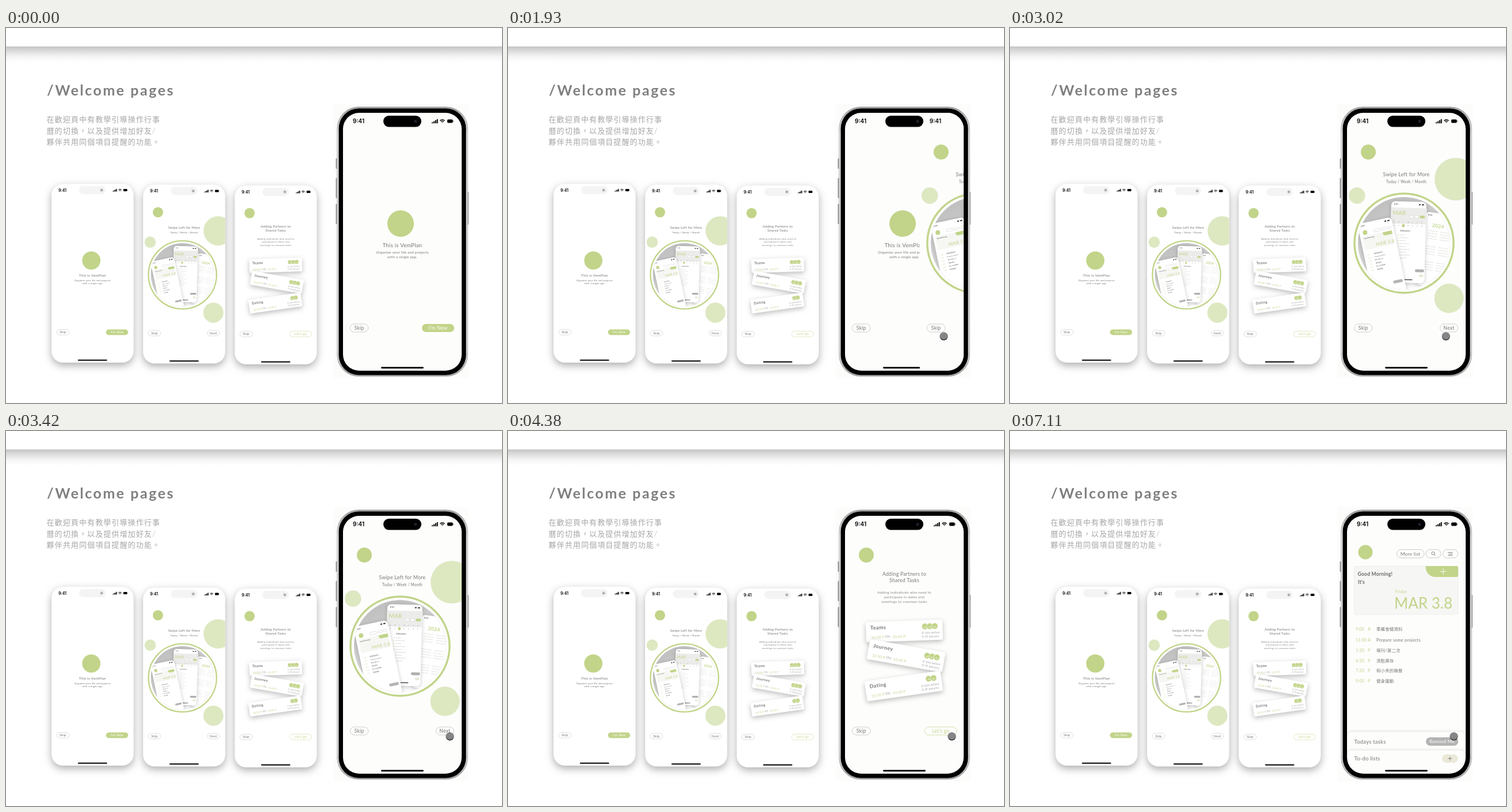
Animation, 861 px wide and 650 px high, one loop 8 s. Source, as an HTML page with a canvas:

```html
<!DOCTYPE html>
<html lang="zh-Hant">
<head>
<meta charset="utf-8">
<title>Welcome pages</title>
<style>
html, body { margin: 0; width: 100%; height: 100%; overflow: hidden; background: #fff; }
canvas { display: block; width: 861px; height: 650px; }
</style>
</head>
<body>
<canvas id="stage"></canvas>
<script>
const W = 861, H = 650, LOOP = 8000;
const GREEN = '#c1d489', PALE = '#dde8c1', GREY = '#777', SOFT = '#999', PAPER = '#fdfdfc';
const FONT = 'Lato, "Noto Sans CJK TC", "Noto Sans CJK", sans-serif';
const CLOCK_FONT = 'Inter, sans-serif';
const SCREEN = { x: 585, y: 147, w: 206, h: 447 };
const MINI = 0.687;
const dpr = window.devicePixelRatio || 1;
let c;

function setup(cv) {
  cv.width = W * dpr;
  cv.height = H * dpr;
  const g = cv.getContext('2d');
  g.scale(dpr, dpr);
  return g;
}

function layer(draw) {
  const cv = document.createElement('canvas');
  c = setup(cv);
  draw();
  return cv;
}

// y is the middle of the capital letters
function text(s, x, y, size, color = GREY, { align = 'left', weight = 400, gap = 0.03, font = FONT } = {}) {
  c.font = `${weight} ${size}px ${font}`;
  c.letterSpacing = size * gap + 'px';
  c.textAlign = align;
  c.fillStyle = color;
  c.fillText(s, x, y + size * 0.36);
}
const centred = (s, x, y, size, color, weight) => text(s, x, y, size, color, { align: 'center', weight });

function box(x, y, w, h, r, fill, stroke, lw = 0.7) {
  c.beginPath();
  c.roundRect(x, y, w, h, r);
  if (fill) { c.fillStyle = fill; c.fill(); }
  if (stroke) { c.strokeStyle = stroke; c.lineWidth = lw; c.stroke(); }
}

function disc(x, y, r, fill) {
  c.beginPath();
  c.arc(x, y, r, 0, 7);
  c.fillStyle = fill;
  c.fill();
}

function line(color, lw, ...p) {
  c.beginPath();
  for (let i = 0; i < p.length; i += 4) {
    c.moveTo(p[i], p[i + 1]);
    c.lineTo(p[i + 2], p[i + 3]);
  }
  c.strokeStyle = color;
  c.lineWidth = lw;
  c.stroke();
}
const plus = (x, y, r, color) => line(color, 0.9, x - r, y, x + r, y, x, y - r, x, y + r);

function shadow(color, blur, dx, dy) {
  c.shadowColor = color;
  c.shadowBlur = blur * dpr;
  c.shadowOffsetX = dx * dpr;
  c.shadowOffsetY = dy * dpr;
}
const noShadow = () => shadow('transparent', 0, 0, 0);

function at(x, y, deg, draw) {
  c.save();
  c.translate(x, y);
  c.rotate(deg * Math.PI / 180);
  draw();
  c.restore();
}

function statusBar() {
  text('9:41', 602, 161.5, 10, '#000', { weight: 600, gap: 0, font: CLOCK_FONT });
  for (let i = 0; i < 4; i++) box(739 + i * 2.9, 163.2 - i * 1.7, 2, 2 + i * 1.7, 0.5, '#000');
  c.strokeStyle = '#000';
  c.lineWidth = 1.3;
  for (const r of [1, 3.3, 5.6]) {
    c.beginPath();
    c.arc(757.5, 164.6, r, -Math.PI * 0.76, -Math.PI * 0.24);
    c.stroke();
  }
  box(766, 158.6, 9.6, 5.8, 1.6, '#000');
  box(776, 160.5, 0.8, 2, 0.4, '#000');
}
const homeBar = () => box(651, 587.4, 74, 2.8, 1.4, '#000');

function button(label, x, w, line, color, fill) {
  box(x, 513, w, 14, 7, fill, line);
  centred(label, x + w / 2, 520, 8.6, color);
}

function page(draw) {
  c.save();
  c.beginPath();
  c.rect(SCREEN.x, SCREEN.y, SCREEN.w, SCREEN.h);
  c.clip();
  c.fillStyle = PAPER;
  c.fillRect(SCREEN.x, SCREEN.y, SCREEN.w, SCREEN.h);
  statusBar();
  draw();
  homeBar();
  c.restore();
}

const skip = () => button('Skip', 597.5, 31.5, '#bbb', GREY);

function intro() {
  disc(685, 339, 23, GREEN);
  centred('This is VemPlan', 688, 377, 9.4, GREY);
  centred('Organize your life and projects', 688, 388.6, 6.4, GREY);
  centred('with a single app.', 688, 397, 6.4, GREY);
  skip();
  button("I'm New", 722, 56, null, '#fff', GREEN);
}

function miniStatus(w) {
  text('9:41', 5, 5, 3.2, '#333', { weight: 600, font: CLOCK_FONT });
  box(w - 13, 4, 3, 2, 0.3, '#333');
  box(w - 8, 4, 4, 2, 0.6, '#333');
}

function miniCard(x, y, deg, w, h, draw) {
  at(x, y, deg, () => {
    shadow('rgba(0,0,0,.22)', 6, 0, 1);
    box(0, 0, w, h, 7, '#fff');
    noShadow();
    miniStatus(w);
    draw();
  });
}

function dayCard() {
  disc(10, 17, 4, GREEN);
  for (const x of [25, 40, 49]) box(x, 15, x < 30 ? 13 : 7, 4, 2, null, '#bbb', 0.4);
  box(4, 23, 52, 24, 1, '#f6f6f3');
  box(40, 23, 16, 6, [0, 1, 0, 4], GREEN);
  text('Good Morning!', 6, 27, 2.6, '#555', { weight: 700 });
  text('MAR 3.8', 24, 41, 8, GREEN);
  ['準備會議資料', 'Prepare projects', '場刊/第二次', '清點庫存', '和小禾的晚餐', '健身運動'].forEach((s, i) => {
    text(i + 2 + ':00', 6, 56 + i * 5.6, 2.5, GREEN);
    text(s, 17, 56 + i * 5.6, 2.6, '#666');
  });
  box(40, 109, 17, 5, 2.5, '#b5b5b5');
}

function monthCard() {
  box(0, 11, 62, 28, 0, '#ececea');
  text('MAR', 3, 20, 10, GREEN);
  for (const x of [32, 41]) box(x, 24, 7, 4.5, 2.2, '#fff', '#bbb', 0.4);
  box(50, 24, 9, 4.5, 2.2, GREEN);
  for (let i = 0; i < 7; i++) {
    text('SMTWTFS'[i], 5 + i * 8, 36, 2.6, '#888');
    disc(6 + i * 8, 42, i == 2 ? 2.6 : 0.7, i == 2 ? GREEN : '#999');
  }
  text('準備會議資料', 16, 51, 3, '#666');
  for (let i = 0; i < 9; i++) {
    disc(13, 58 + i * 5, 0.7, GREEN);
    line('#cfcfcf', 0.7, 16, 58 + i * 5, 25 + i * 7 % 13, 58 + i * 5);
  }
  box(44, 117, 16, 5, 2.5, '#b0b0b0');
  box(51, 126, 8, 4.6, 2.3, '#ebe9d6');
  box(22, 135, 18, 1, 0.5, '#000');
}

function yearCard() {
  text('2024', 14, 22, 8.6, GREEN, { weight: 700 });
  for (let m = 0; m < 6; m++) for (let d = 0; d < 28; d++) {
    const x = 9 + m % 2 * 22 + d % 7 * 2.5, y = 32 + (m >> 1) * 27 + (d / 7 | 0) * 4.5;
    disc(x, y, 0.65, (d * 5 + m) % 9 ? '#c8c8c8' : GREEN);
  }
}

function swipe() {
  disc(622, 215, 13, GREEN);
  disc(774, 262, 37, PALE);
  disc(602.3, 290.5, 14.3, PALE);
  disc(762, 468.5, 25.5, PALE);
  centred('Swipe Left for More', 688, 254, 8.7, GREY);
  centred('Today / Week / Month', 688, 266.5, 6.6, GREY);

  c.save();
  disc(684, 373, 86, '#fff');
  c.strokeStyle = GREEN;
  c.lineWidth = 3.4;
  c.stroke();
  c.beginPath();
  c.arc(684, 373, 80, 0, 7);
  c.clip();
  const g = c.createLinearGradient(640, 295, 715, 450);
  g.addColorStop(0, '#bdbdbd');
  g.addColorStop(0.5, '#d4d4d4');
  g.addColorStop(1, '#fff');
  c.fillStyle = g;
  c.fillRect(600, 290, 170, 170);
  miniCard(722, 318, 8, 58, 128, yearCard);
  miniCard(662, 300, 1.5, 61, 141, monthCard);
  miniCard(603, 340, -12, 60, 130, dayCard);
  c.restore();

  skip();
  button('Next', 746.5, 31, '#bbb', GREY);
}

function taskCard(title, x, y, deg, people) {
  at(x, y, deg, () => {
    shadow('rgba(0,0,0,.26)', 8, 0, 3);
    box(-66.5, -17.5, 133, 35, 3, '#fff');
    noShadow();
    text(title, -59, -7.5, 9, GREY, { weight: 700, gap: 0.05 });
    text('10:30 P', -58, 9.5, 6.3, GREEN);
    text('10m', -34, 8, 4.4, SOFT);
    line('#bbb', 0.5, -34, 10.5, -24, 10.5);
    text('10:40 P', -21, 9.5, 6.3, GREEN);
    for (let i = people; i--;) {
      const px = 53 - i * 8.5;
      disc(px, -6.5, 5.4, GREEN);
      c.strokeStyle = '#fff';
      c.lineWidth = 0.6;
      c.stroke();
      line('#fff', 0.8, px - 2, -5, px + 2, -5);
    }
    text('10m before', 35, 4.5, 4.9, SOFT);
    text('3F balcony', 35, 11, 4.9, SOFT);
    box(30.5, 3, 2.5, 3, 1.2, null, SOFT, 0.5);
    box(30.5, 9.5, 2.5, 3, 1.2, null, SOFT, 0.5);
  });
}

function partners() {
  disc(622, 215, 13, GREEN);
  centred('Adding Partners to', 688, 248, 8.7, GREY);
  centred('Shared Tasks', 688, 258.6, 8.7, GREY);
  centred('Adding individuals who need to', 688, 279.5, 6.4, '#888');
  centred('participate in dates and', 688, 287.5, 6.4, '#888');
  centred('meetings to common tasks', 688, 295.5, 6.4, '#888');
  taskCard('Teams', 688, 346.5, -2, 3);
  taskCard('Journey', 691, 389.5, 10, 3);
  taskCard('Dating', 687, 442, -8, 2);
  skip();
  button("Let's go", 723.5, 55.5, GREEN, GREEN);
}

function sheet(y) {
  shadow('rgba(0,0,0,.12)', 4, 0, -1);
  box(585, y, 205.5, 90, 7, PAPER);
  noShadow();
}

function today() {
  disc(617, 210, 12.5, GREEN);
  for (const [x, w] of [[671.5, 47.5], [722, 26], [751.5, 26]]) box(x, 205.5, w, 14.5, 7.2, null, '#b5b5b5');
  centred('More list', 695, 212.7, 8.4, GREY);
  c.beginPath();
  c.arc(734.5, 212, 2.6, 0, 7);
  c.strokeStyle = GREY;
  c.lineWidth = 0.9;
  c.stroke();
  line(GREY, 0.9, 736.4, 213.9, 738.4, 216, 760, 210.5, 768.5, 210.5, 761.5, 213, 768.5, 213, 760, 215.5, 768.5, 215.5);

  box(597.5, 234.5, 180.5, 83.5, 3, '#f6f6f4', '#e9e9e6');
  box(721.5, 234, 56.5, 19, [0, 3, 3, 17], GREEN);
  plus(752, 243.7, 5.5, '#fff');
  text('Good Morning!', 603.5, 248, 8.5, '#666', { weight: 700 });
  text("It's", 604, 262, 8.5, '#666', { weight: 700 });
  text('Friday', 669, 278.5, 7, GREEN);
  text('MAR 3.8', 667, 299, 26, GREEN, { gap: 0 });

  const rows = [
    ['9:00', 'A', '準備會議資料', 343], ['11:00', 'A', 'Prepare some projects', 362.5],
    ['1:30', 'P', '場刊/第二次', 380], ['4:30', 'P', '清點庫存', 398],
    ['7:20', 'P', '和小禾的晚餐', 415.5], ['9:00', 'P', '健身運動', 433.5]
  ];
  for (const [time, half, what, y] of rows) {
    text(time, 600, y, 7.4, GREEN, { gap: 0 });
    text(half, 621, y, 7.4, GREEN);
    text(what, 636, y, 7.4, GREY);
  }

  sheet(521.5);
  text('Todays tasks', 597.5, 538.7, 9.4);
  box(722, 531, 56, 14.5, 7.2, '#b3b3b3');
  centred('Remind Me', 750, 538.3, 8.4, '#fff');
  sheet(553.5);
  text('To-do lists', 597.5, 568, 9.4);
  box(750, 560.5, 27.5, 14.5, 7.2, '#ebe9d8');
  plus(763.7, 567.7, 3.6, GREY);
}

function miniPhone(x, y, draw) {
  shadow('rgba(0,0,0,.32)', 14, 0, 5);
  box(x, y, 142.5, 310, 20, '#fff');
  noShadow();
  c.save();
  c.beginPath();
  c.roundRect(x, y, 142.5, 310, 20);
  c.clip();
  box(x + 48, y + 4, 46, 14, 7, '#f4f4f4');
  disc(x + 87, y + 11, 3, '#d5d5d5');
  disc(x + 87, y + 11, 1.5, '#999');
  c.translate(x + 0.4, y + 1.8);
  c.scale(MINI, MINI);
  c.translate(-SCREEN.x, -148);
  statusBar();
  draw();
  c.translate(0, 1.6);
  homeBar();
  c.restore();
}

function backdrop() {
  c.fillStyle = '#fff';
  c.fillRect(0, 0, W, H);
  const g = c.createLinearGradient(0, 32, 0, 60);
  g.addColorStop(0, '#c3c5c3');
  g.addColorStop(0.3, '#dcdddc');
  g.addColorStop(0.65, '#f5f5f5');
  g.addColorStop(1, '#fff');
  c.fillStyle = g;
  c.fillRect(0, 32, W, 28);

  text('/Welcome pages', 71, 107.5, 25, '#7f7f7f', { weight: 700, gap: 0.1 });
  ['在歡迎頁中有教學引導操作行事', '曆的切換，以及提供增加好友/', '夥伴共用同個項目提醒的功能。'].forEach((s, i) =>
    text(s, 70.5, 158.7 + i * 19.3, 13, '#a6a6a6', { weight: 300, gap: 0.085 }));

  miniPhone(79, 270, intro);
  miniPhone(238, 271.5, swipe);
  miniPhone(397, 273, partners);

  c.fillStyle = '#fcfcfb';
  c.fillRect(569, 132, 234, 475);
  for (const [x, y, h] of [[572.5, 226, 18], [572.5, 260, 35], [572.5, 305, 35], [800.5, 284, 57]]) box(x, y, 2.5, h, 1, '#9a9a9a');
  const rim = c.createLinearGradient(0, 137, 0, 604);
  rim.addColorStop(0, '#a0a0a0');
  rim.addColorStop(0.1, '#dedede');
  rim.addColorStop(0.9, '#d8d8d8');
  rim.addColorStop(1, '#a0a0a0');
  box(574.8, 136.8, 226.6, 467, 37, rim, '#a4a4a4', 0.7);
  box(577.6, 139.4, 221, 462, 35, '#000');
}

const base = layer(backdrop);
const pages = [intro, swipe, partners, today].map(draw => layer(() => page(draw)));
const island = layer(() => {
  box(655, 152, 66, 19.5, 9.7, '#000');
  disc(711, 161.7, 3, '#15161c');
  disc(711, 161.7, 1.2, '#2b2d3c');
});

const clamp = v => Math.max(0, Math.min(1, v));
const easeOut = p => 1 - (1 - p) ** 1.9;
const easeInOut = p => p * p * (3 - 2 * p);
const mix = (a, b, p) => a + (b - a) * p;

const STARTS = [0, 1820, 4080, 6810], SLIDE = 300;
const PRESSES = [[1650, 1810], [3980, 4070], [6670, 6810]];
const view = setup(document.getElementById('stage'));

function cursor(t) {
  if (t < 500) return;
  const a = easeOut(clamp((t - 480) / 600)), b = easeInOut(clamp((t - 2990) / 430));
  const x = mix(mix(800, 756.5, a), 770.5, b), y = mix(mix(528.5, 534.5, a), 529.5, b);
  disc(x, y, 7, '#2f2f31');
  if (PRESSES.some(([s, e]) => t >= s && t < e)) return;
  c.save();
  c.clip();
  disc(x, y - 1.3, 6.8, '#858587');
  c.restore();
}

function render(t) {
  c = view;
  const put = (cv, x = 0) => c.drawImage(cv, x, 0, W, H);
  put(base);
  c.save();
  c.beginPath();
  c.roundRect(SCREEN.x, SCREEN.y, SCREEN.w, SCREEN.h, 28);
  c.clip();
  const n = STARTS.findLastIndex(s => t >= s);
  const p = n ? clamp((t - STARTS[n]) / SLIDE) : 1;
  if (p < 1) put(pages[n - 1]);
  if (n == 3) {
    c.globalAlpha = p;
    put(pages[n]);
    c.globalAlpha = 1;
  } else {
    put(pages[n], (1 - p) * SCREEN.w);
  }
  c.restore();
  put(island);
  cursor(t);
}

const t0 = performance.now();
function tick() {
  render((performance.now() - t0) % LOOP);
  requestAnimationFrame(tick);
}
tick();
</script>
</body>
</html>
```
